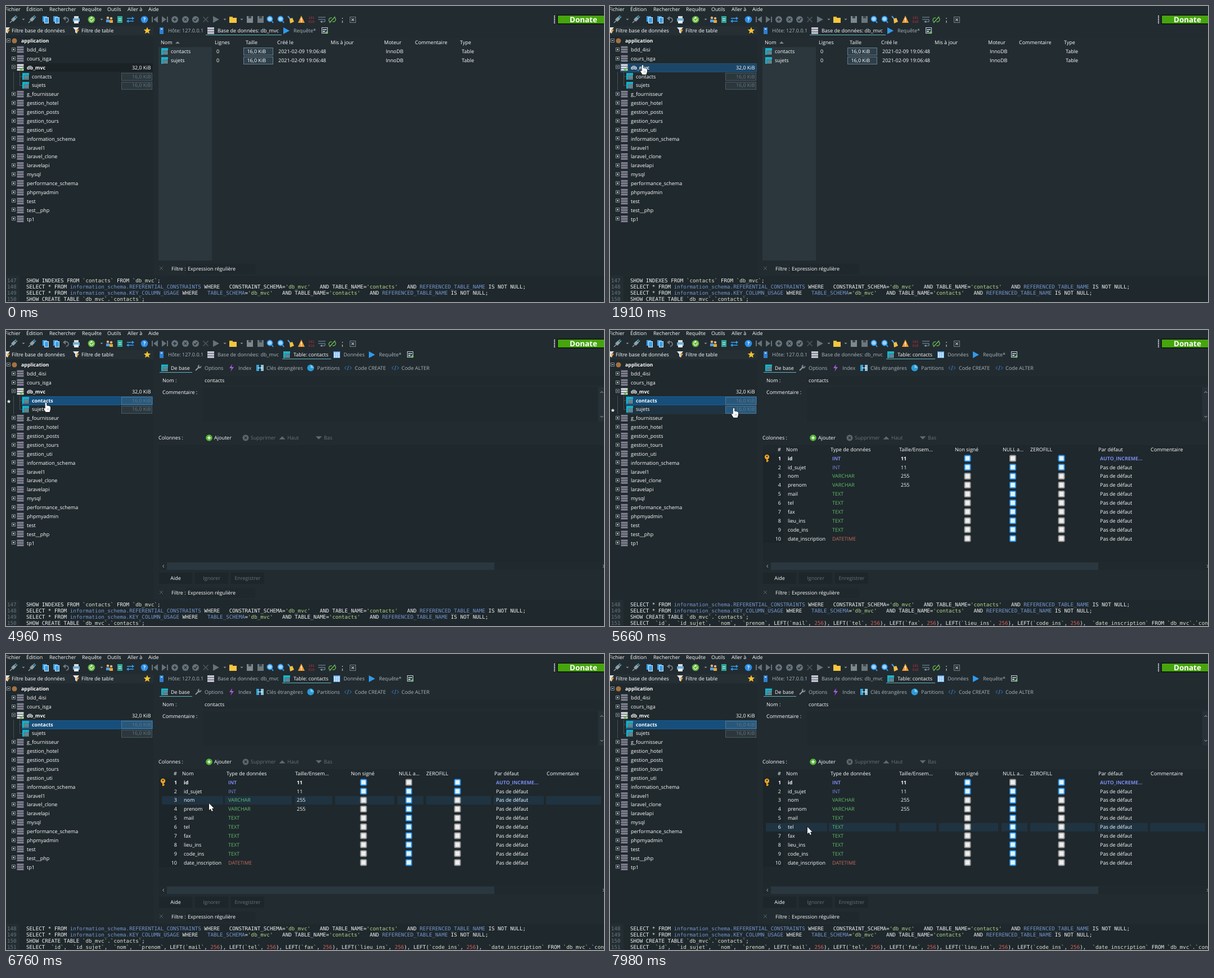
Animation, 1063 px wide and 527 px high, one loop 8 s. Source, as an HTML page with a canvas:

```html
<!DOCTYPE html>
<html lang="fr">
<head>
<meta charset="utf-8">
<title>Gestion de base de données</title>
<style>
html, body { margin: 0; width: 100%; height: 100%; overflow: hidden; background: #222b30; }
canvas { display: block; }
</style>
</head>
<body>
<canvas id="stage" width="1063" height="527"></canvas>
<script>
const ctx = document.getElementById('stage').getContext('2d');
const LOOP = 8000, ROW = 15.87, TAU = Math.PI * 2;
const UI = '"Open Sans", "Noto Sans", sans-serif';
const MONO = '"DejaVu Sans Mono", monospace';
const WHITE = '#ffffff', GREY = '#a9b8bf', DIM = '#66747b', BLUE = '#2f9bf0', CYAN = '#16b5cf';

// ---------- primitives ----------
function box(x, y, w, h, fill, stroke) {
  if (fill) { ctx.fillStyle = fill; ctx.fillRect(x, y, w, h); }
  if (stroke) {
    ctx.strokeStyle = stroke; ctx.lineWidth = 1;
    ctx.strokeRect(x + .5, y + .5, w - 1, h - 1);
  }
}
function text(s, x, y, color = WHITE, bold = false, align = 'left') {
  ctx.font = bold ? `bold 8.8px ${UI}` : `9px ${UI}`;
  ctx.textAlign = align;
  ctx.fillStyle = color;
  ctx.fillText(s, x, y + 3.3);
}
function poly(points, fill) {
  ctx.beginPath();
  for (let i = 0; i < points.length; i += 2) ctx.lineTo(points[i], points[i + 1]);
  ctx.closePath();
  ctx.fillStyle = fill;
  ctx.fill();
}
function line(points, color, width = 1) {
  ctx.beginPath();
  for (let i = 0; i < points.length; i += 2) ctx.lineTo(points[i], points[i + 1]);
  ctx.strokeStyle = color; ctx.lineWidth = width;
  ctx.stroke();
}
function disc(x, y, r, fill) {
  ctx.beginPath(); ctx.arc(x, y, r, 0, TAU);
  ctx.fillStyle = fill; ctx.fill();
}
function ring(x, y, r, color, width = 1.5, from = 0, to = TAU) {
  ctx.beginPath(); ctx.arc(x, y, r, from, to);
  ctx.strokeStyle = color; ctx.lineWidth = width; ctx.stroke();
}
function star(x, y, r, color) {
  const p = [];
  for (let i = 0; i < 10; i++) {
    const a = i * Math.PI / 5 - Math.PI / 2, k = i % 2 ? r * .45 : r;
    p.push(x + k * Math.cos(a), y + k * Math.sin(a));
  }
  poly(p, color);
}
function cross(x, y, r, color, width = 1.2) {
  line([x - r, y - r, x + r, y + r], color, width);
  line([x + r, y - r, x - r, y + r], color, width);
}
function plus(x, y, r, color, width = 1.5) {
  line([x - r, y, x + r, y], color, width);
  line([x, y - r, x, y + r], color, width);
}

// ---------- icons, centred on x, y ----------
const play = (x, y, c) => poly([x - 5, y - 6, x + 6, y, x - 5, y + 6], c);
const up = (x, y, c, r = 5) => poly([x - r, y + r / 2, x, y - r / 2, x + r, y + r / 2], c);
const down = (x, y, c, r = 5) => poly([x - r, y - r / 2, x, y + r / 2, x + r, y - r / 2], c);
const caret = x => down(x, 24, '#8a979d', 2.5);
function dbIcon(x, y, c = '#8f8f9f') {
  for (let i = 0; i < 3; i++) box(x - 6, y - 6 + i * 4.2, 12, 3.4, c);
}
function tableIcon(x, y, c = CYAN) {
  box(x - 6, y - 6, 12, 12, c);
  box(x - 3, y - 2, 9, 8, '#17343e');
  for (let i = 0; i < 3; i++)
    for (let j = 0; j < 3; j++) box(x - 2.3 + i * 2.8, y - 1.4 + j * 2.5, 1.9, 1.6, '#bdeaf2');
}
function dataIcon(x, y) {
  box(x - 6, y - 6, 12, 12, '#4a9de8');
  for (let i = 0; i < 3; i++)
    for (let j = 0; j < 3; j++) box(x - 5 + i * 3.6, y - 4 + j * 3.2, 2.8, 2.4, '#f1f8ff');
}
function newIcon(x, y) {
  box(x - 5, y - 6, 11, 11, null, '#c3d3da');
  box(x - 3, y - 3, 7, 2, '#9db5bf');
  box(x - 3, y, 4, 3, '#9db5bf');
  plus(x + 4, y + 3, 2.5, '#67c44b');
}
function plugIcon(x) {
  line([x - 6, 30, x - 2, 26], '#8fa0a8', 1.5);
  poly([x - 4, 24, x + 1, 19, x + 5, 23, x, 28], '#8fa0a8');
  line([x + 2, 20, x + 5, 17], '#5cc0d8', 1.5);
  line([x + 4, 22, x + 7, 19], '#5cc0d8', 1.5);
}
function pageIcon(x, c) {
  box(x - 5, 18, 8, 10, c);
  box(x - 2, 20, 8, 11, '#d5ecfa');
  box(x - 1, 21, 6, 9, c);
}
function funnel(x) {
  poly([x - 6, 38, x + 5, 38, x + 1, 43, x + 1, 49, x - 2, 47, x - 2, 43], '#dfe7ea');
  poly([x, 42, x + 5, 42, x + 1, 49], '#e99a35');
}
function roundIcon(x, c, sign) {
  disc(x, 24, 6, c);
  if (sign === '+') plus(x, 24, 3, '#222b30');
  if (sign === 'x') cross(x, 24, 2.4, '#222b30');
  if (sign === 'v') line([x - 3, 24, x - 1, 26.5, x + 3, 21.5], '#222b30', 1.5);
}
function saveIcon(x, c) {
  box(x - 5, 18, 11, 12, c);
  box(x - 2, 18, 5, 4, '#3a464c');
}
function searchIcon(x) {
  disc(x, 23, 4.5, '#9fd4fb');
  ring(x, 23, 4.5, BLUE, 1.8);
  line([x + 3, 26, x + 6, 30], BLUE, 2);
}
function codeIcon(x, y) {
  line([x - 3, y - 3, x - 6, y, x - 3, y + 3], '#3d85d8');
  line([x + 3, y - 3, x + 6, y, x + 3, y + 3], '#3d85d8');
  line([x + 1, y - 4, x - 1, y + 4], '#3d85d8');
}

// ---------- top bars ----------
function menuBar() {
  const items = [['Fichier', -2], ['Édition', 36], ['Rechercher', 77], ['Requête', 135],
    ['Outils', 180], ['Aller à', 216], ['Aide', 253]];
  for (const [s, x] of items) text(s, x, 6);
}
function toolbar() {
  plugIcon(13); caret(31); plugIcon(46);
  pageIcon(70, '#3c9fe6'); pageIcon(89, '#3c9fe6');
  ring(107, 25, 4, '#6d7a81', 1.8, -2.6, 1.6);
  poly([101, 22, 106, 18, 106, 26], '#6d7a81');
  box(121, 18, 8, 4, '#d5dde0'); box(119, 22, 12, 6, '#6faed6'); box(121, 26, 8, 5, '#e8eef0');
  disc(152, 24, 6.3, '#63b83c'); ring(152, 24, 3, '#fff', 1.2, -.4, 4.6);
  poly([151, 19, 154.5, 21, 151, 23], '#fff'); caret(170);
  disc(181, 21, 2.3, '#e2b073'); box(178, 24, 6, 5, '#4a9de8');
  disc(187, 22, 2.3, '#e2b073'); box(184, 25, 6, 5, '#e8a83a');
  box(198, 18, 9, 12, '#2fa698'); box(200, 22, 5, 1, '#d6f2ee'); box(200, 25, 5, 1, '#d6f2ee');
  line([215, 22, 225, 22], BLUE, 1.6); poly([224, 19, 228, 22, 224, 25], BLUE);
  line([217, 27, 227, 27], BLUE, 1.6); poly([218, 24, 214, 27, 218, 30], BLUE);
  disc(246, 24, 6.3, '#2b8fe8'); text('?', 246, 24, '#fff', true, 'center');
  const off = '#657279';
  box(259, 19, 2, 10, off); poly([270, 18, 262, 24, 270, 30], off);
  box(286, 19, 2, 10, off); poly([277, 18, 285, 24, 277, 30], off);
  roundIcon(300, off, '+'); roundIcon(319, off, 'x'); roundIcon(337, off, 'v');
  cross(355, 24, 4.5, '#4b575d', 1.6);
  play(373, 24, off); caret(389);
  box(397, 19, 6, 3, '#f0b62c'); box(397, 21, 13, 9, '#f7c63d'); caret(419);
  saveIcon(433, '#7c898f'); saveIcon(452, '#6a777d');
  searchIcon(469); searchIcon(488);
  line([501, 18, 506, 24], '#4a9de8', 2); poly([504, 23, 509, 21, 512, 28, 505, 31], '#f2c040');
  poly([525, 17, 531, 30, 519, 30], '#f39a2d'); box(524.3, 21, 1.5, 5, '#fff'); box(524.3, 27, 1.5, 1.5, '#fff');
  ctx.font = `bold 6px ${MONO}`; ctx.textAlign = 'center'; ctx.fillStyle = '#8c3038';
  ctx.fillText('101', 543, 23); ctx.fillText('010', 543, 30);
  line([555, 20, 568, 20], '#7f99a8'); line([555, 24, 567, 24, 567, 28, 561, 28], '#7f99a8');
  poly([562, 26, 558, 28, 562, 30], '#7f99a8');
  ring(578, 25, 4, '#5aab4a', 1.5, 2, 5); ring(582, 24, 4, '#5aab4a', 1.5, -1, 2);
  line([575, 30, 585, 19], '#79c25f', 1.3);
  box(597, 21, 2, 2, '#78868d'); box(597, 26, 2, 4, '#78868d');
  box(611, 19, 11, 11, null, '#75828a'); cross(616.5, 24.5, 2.3, '#a6b2b8', 1.3);

  for (let y = 17; y < 32; y += 3) box(974, y, 2, 2, '#c8d0d4');
  box(979, 15, 84, 18, '#0c1012', '#1a2024');
  box(981, 17, 82, 14, '#46a50d');
  ctx.font = `bold 13.4px ${UI}`; ctx.textAlign = 'left'; ctx.fillStyle = '#fff';
  ctx.fillText('Donate', 1002, 29);
}
function filterBar() {
  box(0, 36, 262, 16, '#252f34');
  funnel(2); text('Filtre base de données', 10, 43.7);
  funnel(125); text('Filtre de table', 134, 43.7);
  star(251, 44, 6.5, '#f9c22e');
}

// ---------- database tree ----------
const BASES = ['bdd_4isi', 'cours_isga', 'db_mvc', 'contacts', 'sujets', 'g_fournisseur', 'gestion_hotel',
  'gestion_posts', 'gestion_tours', 'gestion_uti', 'information_schema', 'laravel1', 'laravel_clone',
  'laravelapi', 'mysql', 'performance_schema', 'phpmyadmin', 'test', 'test__php', 'tp1'];
const treeY = i => 61.8 + ROW * i;
function toggle(x, y, open) {
  box(x - 3, Math.round(y) - 4, 7, 7, '#20282c', '#7d8990');
  const cy = Math.round(y) - .5;
  line([x - 1, cy, x + 2, cy], '#dfe6e9');
  if (!open) line([x + .5, cy - 1.5, x + .5, cy + 1.5], '#dfe6e9');
}
function tree(opened, hover) {
  box(0, 53, 262, 427, '#20292d');
  toggle(4, 62, true);
  disc(15, 62, 4.5, '#a5713f');
  text('application', 27, 61.8, WHITE, true);
  if (!opened) box(18, 102, 243, 15, '#1b2226');
  BASES.forEach((name, k) => {
    const row = k + 1, y = treeY(row), top = Math.round(y - 7.6);
    const isTable = row === 4 || row === 5;
    const selected = row === (opened ? 4 : 3);
    const left = isTable ? 28 : 18; // highlight begins after the indent
    if (selected && (opened || hover === row))
      box(left, top, 261 - left, 16, opened ? '#164f7c' : '#1c4668', opened ? '#1d5c8d' : '#235274');
    else if (hover === row) box(left, top, 261 - left, 16, '#1f3443');
    if (isTable) {
      line([24, Math.round(y) + .5, 30, Math.round(y) + .5], '#465157');
      tableIcon(35, y);
      text(name, 46, y, WHITE, selected);
      const lit = selected || hover === row;
      box(205, top + 1, 55, 14, lit ? '#27587c' : '#2b373d', lit ? '#4f7691' : '#4c5a62');
      text('16,0 KiB', 257.5, y, '#66757d', false, 'right');
      if (hover === row) star(5, y + 2, 3.6, '#e8eef0');
    } else {
      toggle(13, y, row === 3);
      dbIcon(25.5, y, row === 3 ? '#d9d9e2' : '#7e7e8e');
      if (row === 3) {
        line([25, y + 3, 27, y + 5, 31, y], '#6bc046', 2);
        text('32,0 KiB', 257.5, y, WHITE, false, 'right');
      }
      text(name, 37, y, WHITE, row === 3);
    }
  });
  line([13.5, 117, 13.5, 150], '#465157');
  line([24.5, 117, 24.5, 141.5], '#465157');
}

// ---------- main tabs ----------
function tabs(opened) {
  box(273, 38, 7, 12, '#2d7fd0'); box(275, 40, 3, 2, '#b8dcfa');
  text('Hôte: 127.0.0.1', 288, 44, GREY);
  dbIcon(364, 44, '#c9cbd6');
  text('Base de données: db_mvc', 376, 44, opened ? GREY : WHITE);
  if (opened) {
    tableIcon(499, 44);
    text('Table: contacts', 511, 44);
    dataIcon(588, 44);
    text('Données', 600, 44, GREY);
    play(650, 44, BLUE);
    text('Requête*', 663, 44, GREY);
    newIcon(718, 44);
    box(491, 51, 87, 1, '#5fb7bd');
  } else {
    play(498, 44, BLUE);
    text('Requête*', 511, 44, GREY);
    newIcon(566, 44);
    box(355, 51, 135, 1, '#5fb7bd');
  }
}
function tableList() {
  box(270, 57, 793, 396, '#222c31');
  box(271, 73, 95, 380, '#2b373c');
  const heads = [['Nom', 275], ['Lignes', 371], ['Taille', 426], ['Créé le', 482], ['Mis à jour', 577],
    ['Moteur', 672], ['Commentaire', 727], ['Type', 807]];
  for (const [s, x] of heads) text(s, x, 65);
  up(305, 65, '#7d8a90', 4);
  ['contacts', 'sujets'].forEach((name, i) => {
    const y = 81 + i * 16;
    tableIcon(282, y);
    text(name, 293, y);
    text('0', 374, y);
    box(422, y - 7, 53, 14, '#2f404b', '#687f8d');
    text('16,0 KiB', 462, y, WHITE, false, 'right');
    text('2021-02-09 19:06:48', 484, y);
    text('InnoDB', 675, y);
    text('Table', 810, y);
  });
}

// ---------- table editor ----------
const COLS = [['id', 'INT', '11'], ['id_sujet', 'INT', '11'], ['nom', 'VARCHAR', '255'], ['prenom', 'VARCHAR', '255'],
  ['mail', 'TEXT', ''], ['tel', 'TEXT', ''], ['fax', 'TEXT', ''], ['lieu_ins', 'TEXT', ''], ['code_ins', 'TEXT', ''],
  ['date_inscription', 'DATETIME', '']];
const TYPE_COLOR = { INT: '#7d86e8', VARCHAR: '#62bd6c', TEXT: '#62bd6c', DATETIME: '#c76b5f' };
const CELLS = [[277, 386], [389, 508], [514, 580], [585, 690], [696, 742], [747, 862], [867, 956], [960, 1058]];
const gridY = i => 228.4 + ROW * i;

function check(x, y, on) {
  ctx.beginPath();
  ctx.roundRect(x - 5, y - 5, 10, 10, 1.5);
  ctx.fillStyle = on ? '#e4f3ff' : '#eeeeee'; ctx.fill();
  ctx.strokeStyle = on ? '#2592ec' : '#9a9a9a'; ctx.lineWidth = 2; ctx.stroke();
}
function grid(hover) {
  const heads = [['#', 298], ['Nom', 313], ['Type de données', 392], ['Taille/Ensem...', 514], ['Non signé', 613],
    ['NULL a...', 698], ['ZEROFILL', 747], ['Par défaut', 868], ['Commentaire', 961]];
  for (const [s, x] of heads) text(s, x, 212.5);
  box(272, 220, 36, 159, '#1c2529');
  COLS.forEach(([name, type, size], i) => {
    const y = gridY(i), first = i === 0;
    if (i === hover) for (const [a, b] of CELLS) box(a, Math.round(y) - 7, b - a, 15, '#1f3341');
    text(String(i + 1), 304, y, WHITE, first, 'right');
    text(name, 316, y, WHITE, first);
    text(type, 395, y, TYPE_COLOR[type], first);
    text(size, 517, y, WHITE, first);
    check(635.5, y, i < 2);
    check(716, y, !first);
    check(802.5, y, i < 2);
    text(first ? 'AUTO_INCREME...' : 'Pas de défaut', 871, y, first ? '#7b8cf0' : WHITE, first);
  });
  disc(279, 226, 4.2, '#f0a024'); disc(279, 225, 1.3, '#222b30');
  box(278, 229, 2.5, 6, '#f0a024'); box(280, 232, 2, 1.5, '#f0a024');
}
function editor(hover, filled) {
  tableIcon(282, 67.5); text('De base', 293, 67.5); box(273, 75, 58, 1, '#5fb7bd');
  line([337, 72, 344, 65], '#8b99a0', 2.2); ring(344, 65, 2.5, '#8b99a0', 1.5, -.3, 4.5);
  text('Options', 353, 67.5, GREY);
  poly([402, 61, 397, 68, 401, 68, 399, 74, 405, 66, 401, 66], '#b05ae0'); text('Index', 413, 67.5, GREY);
  box(445, 62, 5, 11, '#38a5d8'); box(453, 62, 5, 11, '#8cc4de'); line([448, 67.5, 456, 67.5], '#fff');
  text('Clés étrangères', 463, 67.5, GREY);
  disc(541.5, 67.5, 6, '#2a9bd8'); poly([541.5, 67.5, 541.5, 61.5, 547.5, 67.5], '#7fd0ee');
  text('Partitions', 553, 67.5, GREY);
  codeIcon(608, 67.5); text('Code CREATE', 620, 67.5, GREY);
  codeIcon(692, 67.5); text('Code ALTER', 703, 67.5, GREY);

  box(350, 82, 713, 16, '#20292e');
  text('Nom :', 278, 90); text('contacts', 353, 90);
  box(350, 102, 702, 61, '#20292e');
  box(1053, 102, 10, 61, '#273137');
  line([1056.5, 112, 1059, 109.5, 1061.5, 112], GREY); line([1056.5, 153, 1059, 155.5, 1061.5, 153], GREY);
  text('Commentaire :', 278, 111);

  text('Colonnes :', 271, 192);
  disc(361, 192, 5.8, '#55b53a'); plus(361, 192, 3, '#fff'); text('Ajouter', 370, 192);
  disc(426, 192, 5.5, '#5b676d'); cross(426, 192, 2, '#222b30'); text('Supprimer', 435, 192, DIM);
  up(491, 192, '#5f6b71', 5.5); text('Haut', 500, 192, DIM);
  down(556, 192, '#5f6b71', 5.5); text('Bas', 565, 192, DIM);

  box(272, 205, 791, 208, '#1f282c');
  if (filled) grid(hover);
  box(272, 414, 791, 13, '#20292d');
  box(286, 414, 582, 13, '#2a373f');
  line([281, 418, 278.5, 420.5, 281, 423], GREY);
  line([1061, 418, 1063.5, 420.5, 1061, 423], GREY);
  [['Aide', 272, WHITE], ['Ignorer', 336, DIM], ['Enregistrer', 400, DIM]].forEach(([s, x, c]) => {
    box(x, 432, 59, 20, '#1d262a');
    text(s, x + 29.5, 442, c, false, 'center');
  });
}

// ---------- query log ----------
const LOG = [
  'SHOW INDEXES FROM `contacts` FROM `db_mvc`;',
  "SELECT * FROM information_schema.REFERENTIAL_CONSTRAINTS WHERE   CONSTRAINT_SCHEMA='db_mvc'   AND TABLE_NAME='contacts'   AND REFERENCED_TABLE_NAME IS NOT NULL;",
  "SELECT * FROM information_schema.KEY_COLUMN_USAGE WHERE   TABLE_SCHEMA='db_mvc'   AND TABLE_NAME='contacts'   AND REFERENCED_TABLE_NAME IS NOT NULL;",
  'SHOW CREATE TABLE `db_mvc`.`contacts`;',
  'SELECT  `id`,  `id_sujet`,  `nom`,  `prenom`, LEFT(`mail`, 256), LEFT(`tel`, 256), LEFT(`fax`, 256), LEFT(`lieu_ins`, 256), LEFT(`code_ins`, 256),  `date_inscription` FROM `db_mvc`.`contacts` LIMIT 1000;'
];
const TOKEN = /('[^']*'|`[^`]*`|information_schema\.\w+|\bTABLE_SCHEMA|REFERENCED_TABLE_NAME|\b256\b)/;
function tokenColor(s) {
  if (s[0] === "'") return '#b4d68c';
  if (s[0] === '`') return '#dfe3d0';
  if (s === '256') return '#d9605c';
  return TOKEN.test(s) ? '#7596d0' : '#f0f2f3';
}
function log(first) {
  box(0, 480, 1063, 47, '#1f282c');
  box(0, 480, 24, 47, '#232d32');
  ctx.font = `9.22px ${MONO}`;
  ctx.textAlign = 'left';
  for (let i = 0; i < 4; i++) {
    const y = 492 + i * 11;
    ctx.fillStyle = '#67777f';
    ctx.fillText(147 + first + i, 2, y);
    let n = 0;
    for (const part of LOG[first + i].split(TOKEN)) {
      ctx.fillStyle = tokenColor(part);
      ctx.fillText(part, 36 + n * 5.55, y);
      n += part.length;
    }
  }
}
function filterBottom() {
  cross(276, 467, 3, '#566269', 1);
  box(320, 459, 123, 18, '#1f282c');
  text('Filtre :', 294, 468); text('Expression régulière', 323, 468);
}

// ---------- pointer: bursts of [start, end, steps, path] ----------
const MOVES = [
  [70, 210, 3, [[1058, 521], [1038, 517]]],
  [360, 510, 3, [[900, 450], [467, 296]]],
  [760, 820, 2, [[264, 268], [222, 217]]],
  [1050, 1830, 11, [[214, 212], [150, 172], [95, 130], [62, 106]]],
  [1910, 2710, 11, [[58, 105], [33, 106], [60, 115]]],
  [2780, 3180, 6, [[62, 118], [71, 129]]],
  [5660, 5810, 3, [[220, 139], [432, 219]]],
  [5960, 6360, 6, [[418, 153], [385, 232], [356, 341]]],
  [6590, 7360, 11, [[357, 318], [361, 266], [361, 252], [360, 243], [360, 235], [360, 230]]],
  [7440, 7980, 8, [[360, 231], [359, 234], [358, 243], [357, 254], [355, 268], [354, 283], [352, 297], [351, 308]]]
];
function pointerAt(t) {
  const move = MOVES.filter(m => t >= m[0]).pop();
  if (!move) return null;
  const [from, to, steps, path] = move;
  const step = Math.min(steps - 1, Math.floor((t - from) * (steps - 1) / (to - from) + .15));
  const p = step / (steps - 1) * (path.length - 1);
  const i = Math.min(path.length - 2, Math.floor(p)), k = p - i;
  return [0, 1].map(a => path[i][a] + (path[i + 1][a] - path[i][a]) * k);
}
const ARROW = new Path2D('M0 0V12L2.8 9.5L4.8 14L6.8 13.1L4.9 8.8H8.6Z');
const HAND = new Path2D('M-1.3 .8Q0 -.8 1.3 .8V5.5L6.5 6.6Q8 7 8 8.6V12L6.5 17H-.4L-3.8 11.6Q-4 9.6 -1.3 10.8Z');
function pointer([x, y]) {
  ctx.save();
  ctx.translate(x, y);
  if (x > 261 && x < 270) {
    line([-5, 0, 5, 0], '#fff', 1.5);
    poly([-8, 0, -4, -3, -4, 3], '#fff'); poly([8, 0, 4, -3, 4, 3], '#fff');
  } else {
    const shape = x < 262 ? HAND : ARROW;
    ctx.strokeStyle = '#10161a'; ctx.lineWidth = 1.2;
    ctx.stroke(shape);
    ctx.fillStyle = '#fff'; ctx.fill(shape);
    if (shape === HAND) {
      line([2.6, 10.5, 2.6, 13.5], '#7b858a', .7);
      line([4.8, 10.5, 4.8, 13.5], '#7b858a', .7);
    }
  }
  ctx.restore();
}

function draw(t) {
  const opened = t >= 4960, p = pointerAt(t);
  let treeRow = -1, gridRow = -1;
  if (p && p[0] < 262) treeRow = Math.round((p[1] + 1 - treeY(0)) / ROW);
  else if (p && opened && p[1] > 221) gridRow = Math.round((p[1] - gridY(0)) / ROW);

  box(0, 0, 1063, 527, '#222b30');
  menuBar();
  toolbar();
  filterBar();
  tree(opened, treeRow);
  tabs(opened);
  if (opened) editor(gridRow, t >= 5120);
  else tableList();
  filterBottom();
  log(t >= 5200 ? 1 : 0);
  if (p) pointer(p);
}

ctx.textRendering = 'geometricPrecision';
const start = performance.now();
function tick() {
  draw((performance.now() - start) % LOOP);
  requestAnimationFrame(tick);
}
tick();
</script>
</body>
</html>
```
